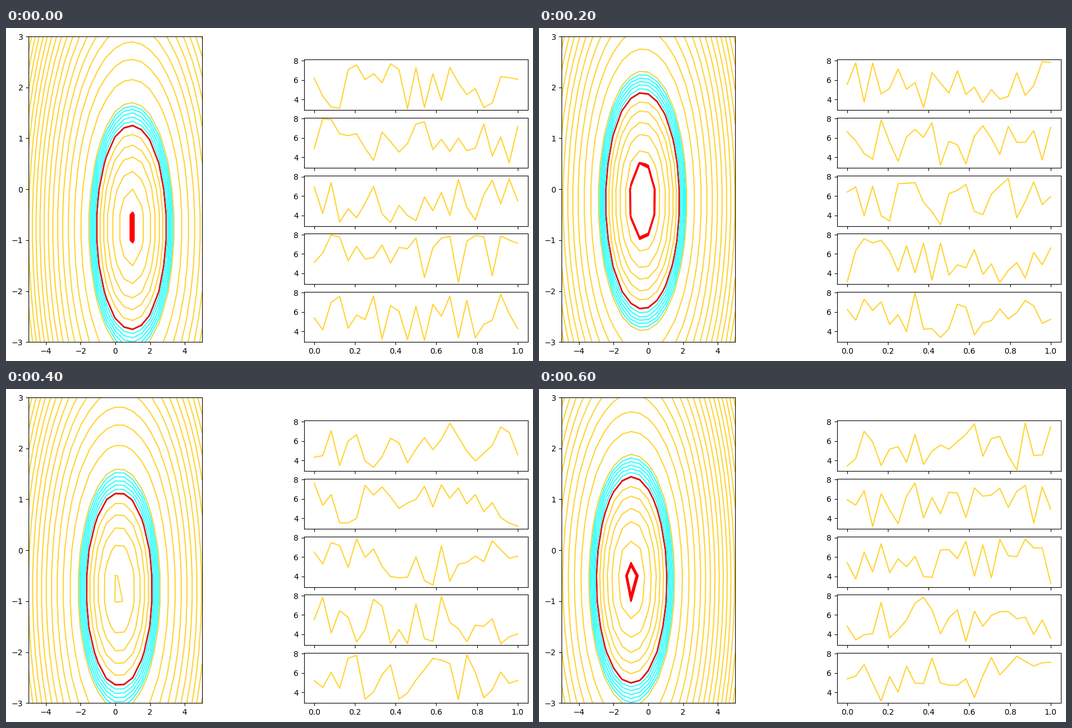
Animation of 935 by 593 pixels, one loop 800 ms. Source, as a matplotlib script:

```python
import matplotlib.pyplot as plt
import numpy as np
from matplotlib.animation import FuncAnimation

WIDTH, HEIGHT, DPI = 935, 593, 100
YELLOW, CYAN, RED = "#ffd433", "#33ffff", "#ff0000"
DARK_RED, DULL_YELLOW = "#e2120c", "#ebd548"

# Bowl of each step: centre x, centre y, lowest value
BOWLS = [
    (0.93, -0.75, 0.93),
    (-0.33, -0.228, 0.44),
    (0.225, -0.765, 1.373),
    (-0.96, -0.583, 0.867),
]

BANDS = [
    (np.linspace(1, 1.05, 8), RED),
    (np.arange(1.5, 4.5, 0.7), YELLOW),
    (np.linspace(4.98, 5.02, 3), DARK_RED),
    (5 + np.arange(1, 6) / 3, CYAN),
    ([7], DULL_YELLOW),
    (7 + 2.42 * np.arange(1, 21), YELLOW),
]
LEVELS = np.concatenate([levels for levels, _ in BANDS])
COLORS = [color for levels, color in BANDS for _ in levels]

PANELS, SAMPLES = 5, 25

plt.rcParams["font.family"] = "DejaVu Sans"
fig = plt.figure(figsize=(WIDTH / DPI, HEIGHT / DPI), dpi=DPI, facecolor="white")


def add_axes(left, top, right, bottom):
    """Axes from pixel edges measured from the top left corner."""
    return fig.add_axes([left / WIDTH, 1 - bottom / HEIGHT,
                         (right - left) / WIDTH, (bottom - top) / HEIGHT])


bowl_ax = add_axes(40, 15.12, 347.95, 559.2)
bowl_ax.set(xlim=(-5, 5), ylim=(-3, 3),
            xticks=range(-4, 5, 2), yticks=range(-3, 4))
grid_x, grid_y = np.meshgrid(np.linspace(-5, 5, 21), np.linspace(-3, 3, 13))

times = np.linspace(0, 1, SAMPLES)
lines = []
for row in range(PANELS):
    top = 56.4 + 103.3 * row
    ax = add_axes(528.8, top, 925.9, top + 89.6)
    ax.set(xlim=(-0.05, 1.05), ylim=(2.9, 8.1),
           xticks=np.linspace(0, 1, 6), yticks=(4, 6, 8))
    ax.tick_params(labelbottom=row == PANELS - 1)
    lines += ax.plot(times, np.full(SAMPLES, 3.0), color=YELLOW, lw=1.5)


def update(step):
    for old in list(bowl_ax.collections):
        old.remove()
    cx, cy, floor = BOWLS[step]
    height = (grid_x - cx) ** 2 + (grid_y - cy) ** 2 + floor
    contours = bowl_ax.contour(grid_x, grid_y, height, levels=LEVELS,
                               colors=COLORS, linewidths=1.5)
    noise = np.random.default_rng(step).uniform(3, 8, (PANELS, SAMPLES))
    for line, values in zip(lines, noise):
        line.set_ydata(values)
    return [contours, *lines]


animation = FuncAnimation(fig, update, frames=len(BOWLS), interval=200,
                          repeat=True, blit=False)
plt.show()
```
